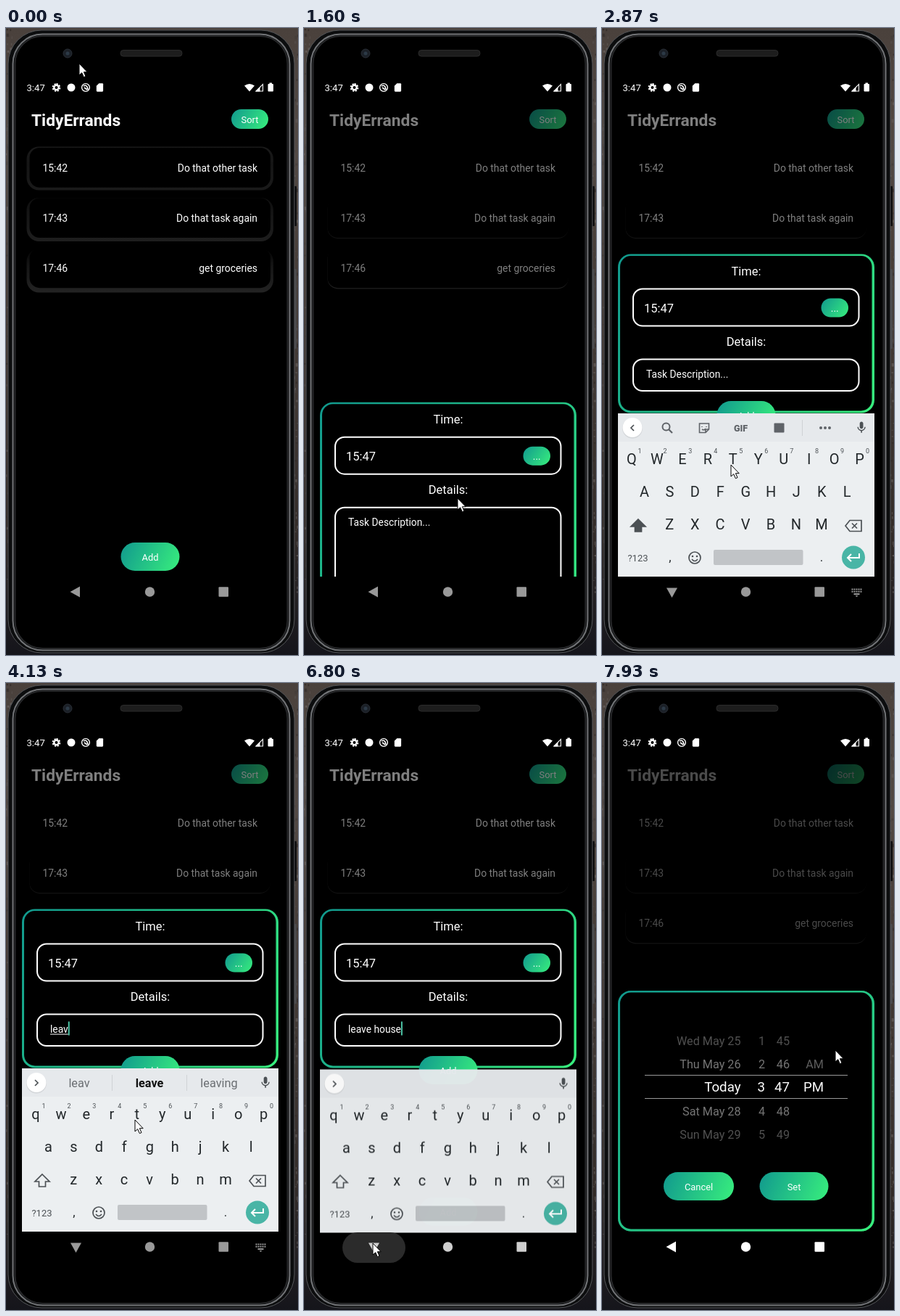
Recreate the animation shown at these times as an HTML page with a canvas. Size 403 by 864 pixels, loop 8000 ms.

```html
<!DOCTYPE html>
<html lang="en">
<head>
<meta charset="utf-8">
<title>Task list on a phone</title>
<style>
html, body { margin: 0; height: 100%; overflow: hidden; background: #000; }
canvas { display: block; }
</style>
</head>
<body>
<canvas id="stage" width="403" height="864"></canvas>
<script>
const stage = document.getElementById('stage');
const layer = stage.cloneNode();
const screen2d = stage.getContext('2d'), layer2d = layer.getContext('2d');
let c = screen2d; // context the helpers draw on
const LOOP = 8000, FPS = 15, TEAL = '#11998e', GREEN = '#38ef7d';
const clamp = v => Math.max(0, Math.min(1, v));
const ease = u => (1 - Math.cos(Math.PI * clamp(u))) / 2;

// ---- drawing helpers ----
function box(x, y, w, h, r, fill, stroke, lw = 1) {
  c.beginPath();
  c.roundRect(x, y, w, h, r);
  if (fill) { c.fillStyle = fill; c.fill(); }
  if (stroke) { c.strokeStyle = stroke; c.lineWidth = lw; c.stroke(); }
}
function disc(x, y, r, fill, stroke, lw) { box(x - r, y - r, 2 * r, 2 * r, r, fill, stroke, lw); }
function shape(d, x, y, scale, fill, stroke, lw = 1) {
  const p = new Path2D(d);
  c.save();
  c.translate(x, y);
  c.scale(scale, scale);
  if (fill) { c.fillStyle = fill; c.fill(p, 'evenodd'); }
  if (stroke) { c.strokeStyle = stroke; c.lineWidth = lw; c.stroke(p); }
  c.restore();
}
function text(s, x, y, size, color = '#fff', align = 'left', weight = 400) {
  c.font = `${weight} ${size}px Roboto, sans-serif`;
  c.textAlign = align;
  c.fillStyle = color;
  c.fillText(s, x, y);
  return c.measureText(s).width;
}
function brand(x, y, w, h) {
  const g = c.createLinearGradient(x, y, x + w, y + h);
  g.addColorStop(0, TEAL);
  g.addColorStop(1, GREEN);
  return g;
}
function pill(label, x, y, w, h, size = 12.9) {
  box(x, y, w, h, h / 2, brand(x, y, w, h));
  text(label, x + w / 2, y + h / 2 + 5, size, '#fff', 'center');
}
function panel(y, h) {
  box(22, y, 354, h, 18, brand(22, y, 354, h));
  box(25, y + 2.5, 347.5, h - 5.5, 15, '#000');
}
function clipTo(bottom, draw) {
  c.save();
  c.beginPath();
  c.rect(22, 70, 354, bottom - 70);
  c.clip();
  draw();
  c.restore();
}
function dim(a) {
  c.fillStyle = `rgba(0,0,0,${a})`;
  c.fillRect(22, 98, 354, 658);
}

// ---- phone body ----
function phone() {
  const g = c.createLinearGradient(0, 0, 0, 864);
  ['#4a413c', '#524944', '#453c37', '#3f3733', '#332c29', '#15151b']
    .forEach((color, i) => g.addColorStop(i / 5, color));
  c.fillStyle = g;
  c.fillRect(0, 0, 403, 864);
  let seed = 7;
  const rnd = () => (seed = seed * 16807 % 2147483647) / 2147483647;
  for (let i = 0; i < 260; i++) {
    const v = 25 + rnd() * 90 | 0;
    c.fillStyle = `rgba(${v + 8},${v + 2},${v},.5)`;
    c.fillRect(rnd() < .5 ? rnd() * 9 : 394 + rnd() * 9, rnd() * 800, 1 + rnd() * 2, 1 + rnd() * 4);
  }
  box(396, 218, 5, 55, 1, '#0b0b0c');
  box(396, 332, 5, 110, 1, '#4a4a4c');
  box(3, 3, 395, 858, 46, '#0c0d0e', '#55575a');
  box(9.5, 8.5, 382, 849, 41, null, '#727477', 2);
  box(12.5, 11, 376, 844, 38, '#000', '#262729', 2);
  box(158, 30.5, 85, 8.5, 4, '#1d1d1d', '#2b2b2b');
  disc(85, 35, 6, '#1b2027', '#2a2f36');
  disc(85, 35, 2.5, '#2c3a47');
}

function statusBar() {
  text('3:47', 28.5, 87, 13.1);
  c.setLineDash([2.2, 1.57]);
  disc(69.5, 82, 4.8, null, '#fff', 2.2);
  c.setLineDash([]);
  disc(69.5, 82, 3.2, null, '#fff', 2.4);
  disc(90, 82, 5.5, '#fff');
  disc(110, 82, 5.4, null, '#fff', 1.4);
  shape('M-3-2Q0-4 2-1Q3 2 3 3M-2 0L2 3', 110, 82, 1, null, '#fff', 1.6);
  shape('M18 2h-8L4 8v12q0 2 2 2h12q2 0 2-2V4q0-2-2-2z', 122.5, 75, .58, '#fff');
  shape('M0 3Q7-2 14 3L7 11z', 329, 76.5, 1, '#fff');
  shape('M.5 10.5L10 1V10.5z', 344.5, 76.5, 1, null, '#fff', 1.1);
  shape('M0 11L6 5V11z', 344.5, 76.5, 1, '#fff');
  box(361.5, 77, 7.5, 10.5, 1, '#fff');
  box(363.5, 75.5, 3.5, 2, 0, '#fff');
}

function taskList(dimmed) {
  text('TidyErrands', 35, 134.5, 22.8, '#fff', 'left', 700);
  pill('Sort', 311, 112, 51, 27);
  [['15:42', 'Do that other task'], ['17:43', 'Do that task again'], ['17:46', 'get groceries']]
    .forEach(([time, task], i) => {
      const y = 165 + i * 69.2, drop = i * 1.3;
      if (!dimmed) {
        const g = c.createLinearGradient(0, y - 2, 0, y + 58 + drop);
        g.addColorStop(0, ['#1a1a1a', '#0e0e0e', '#000'][i]);
        g.addColorStop(.4, '#151515');
        g.addColorStop(1, ['#1a1a1a', '#1e1e1e', '#232323'][i]);
        box(28.5, y - 1.5 + drop, 340.5, 60, 17, g);
      } else if (i) {
        box(32.5, y + 1, 332, 55, 14, ['', '#262626', '#424242'][i]);
      }
      box(32.5, y, 332.5, 54.8, 14, '#000');
      text(time, 50.5, y + 33, 13.9);
      text(task, 347, y + 33, 13.9, '#fff', 'right');
    });
  pill('Add', 158.5, 709, 81, 39);
}

// ---- task form ----
function form(y, small, value, composing, caret) {
  panel(y, small ? 219 : 331.5);
  text('Time:', 199, y + 29.5, 16.5, '#fff', 'center');
  box(43, y + 48, 311.5, 51, 13, null, '#fff', 2);
  text('15:47', 58, y + 80.5, 16.5);
  pill('...', 302.5, y + 61, 37.5, 26, 13.8);
  text('Details:', 199, y + 126, 16.5, '#fff', 'center');
  box(43, y + 145, 311.5, small ? 43.5 : 118, 13, null, '#fff', 2);
  const w = text(value || 'Task Description...', 61, y + 170, 13.8);
  if (composing) {
    const start = c.measureText(value.slice(0, value.lastIndexOf(' ') + 1)).width;
    c.fillStyle = '#fff';
    c.fillRect(61 + start, y + 172, w - start, 1);
  }
  if (caret) {
    c.fillStyle = '#4cc3a5';
    c.fillRect(61 + (value ? w : 0), y + 155, 2, 19);
  }
  pill('Add', 158.5, y + (small ? 202.5 : 276), 81, 39);
}

// ---- date and time wheel ----
function picker(y) {
  panel(y, 331.5);
  const dates = ['Wed May 25', 'Thu May 26', 'Today', 'Sat May 28', 'Sun May 29'];
  dates.forEach((date, i) => {
    const far = Math.abs(i - 2), size = far ? 16.2 : 18.7;
    const color = ['#fff', '#757575', '#505050'][far], base = y + 74.5 + i * 32.4;
    text(date, 191.5, base, size, color, 'right');
    text(i + 1, 225, base, size, color, 'right');
    text(45 + i, 259, base, size, color, 'right');
    if (i == 1 || i == 2) text(i == 1 ? 'AM' : 'PM', 306, base, size, i == 1 ? '#5c5c5c' : color, 'right');
  });
  c.fillStyle = '#999';
  c.fillRect(59, y + 116, 280, 1);
  c.fillRect(59, y + 148, 280, 1);
  pill('Cancel', 85, y + 250, 97, 39);
  pill('Set', 217.5, y + 250, 95, 39);
}

// ---- keyboard ----
const MIC = 'M12 14c1.7 0 3-1.3 3-3V5c0-1.7-1.3-3-3-3S9 3.3 9 5v6c0 1.7 1.3 3 3 3zm5.3-3c0 3-2.5 5.1-5.3 5.1S6.7 14 6.7 11H5c0 3.4 2.7 6.2 6 6.7V21h2v-3.3c3.3-.5 6-3.3 6-6.7z';

function house() {
  box(191, 550, 13, 9, 0, '#f3d9b1');
  box(193, 552, 4, 7, 0, '#8d5a3b');
  box(199, 552, 4, 4, 0, '#5aa9d6');
  box(202, 543, 2.5, 6, 0, '#a5432f');
  shape('M-10 1L0-9L10 1L8 2.5L0-5L-8 2.5z', 198, 551, 1, '#dd4b39');
  shape('M-7 1L0-5.5L7 1z', 198, 550, 1, '#f0a33a');
  disc(204, 558, 2.5, '#5f9e3f');
}
function suggestions(words) {
  c.fillStyle = '#cfd2d5';
  c.fillRect(146, 540, 1, 22);
  c.fillRect(249, 540, 1, 22);
  words.forEach((word, i) => {
    if (word == 'HOUSE') house();
    else text(word, [101, 198, 294][i], 557, 16.3, i == 1 ? '#111' : '#6a6e72', 'center', i == 1 ? 700 : 400);
  });
}
function toolbar() {
  const ink = '#5f6368';
  disc(88.5, 549.5, 5, null, ink, 2);
  shape('M0 0L5 5', 92, 553, 1, null, ink, 2.2);
  shape('M-6-6H6.5V2L2 6.5H-6.5V-6zM6 2H2V6M-3-2v1M3-2v1M-3 2Q0 4 2 1', 141, 551, 1, null, ink, 1.6);
  text('GIF', 191.5, 555.5, 12.5, ink, 'center', 900);
  box(237.5, 544.5, 14, 13, 1, ink);
  c.fillStyle = '#cfd2d5';
  c.fillRect(276, 540, 1, 22);
  [302, 308, 314].forEach(x => disc(x, 551, 2, ink));
}
function keyboard(upper, words) {
  const ink = '#22272a', soft = '#4c5155';
  box(22, 531, 354, 270, 0, '#eceff1');
  box(22, 531, 354, 39, 0, '#e6e9ec');
  disc(42, 551.5, 14, '#d3d6d9');
  disc(42, 550.5, 13.5, '#fff');
  shape(upper ? 'M2-4L-2 0L2 4' : 'M-2-4L2 0L-2 4', 42, 551, 1, null, soft, 1.7);
  shape(MIC, 348.5, 541, .8, soft);
  if (upper) toolbar();
  else if (words) suggestions(words);

  [['qwertyuiop', 41, 601], ['asdfghjkl', 58.5, 646], ['zxcvbnm', 93.2, 691]].forEach(([keys, x, y], row) => {
    [...keys].forEach((key, i) => {
      const kx = x + i * 34.95;
      text(upper ? key.toUpperCase() : key, kx, y, 20, ink, 'center');
      if (!row) text((i + 1) % 10, kx + 11, 586, 9, soft, 'center');
    });
  });
  shape('M0-9L10 1H4.5V8H-4.5V1H-10z', 50, 686, 1, upper ? soft : null, soft, 1.7);
  shape('M-5-7.5H11V7.5H-5L-11 0zM-2-3.5L5 3.5M5-3.5L-2 3.5', 347, 686, 1, null, soft, 1.7);
  text('?123', 49.5, 734.5, 13, soft, 'center');
  text(',', 94, 735, 17, ink, 'center');
  text('.', 303, 735, 17, ink, 'center');
  disc(128, 730, 8, null, soft, 1.7);
  disc(125, 728, 1.3, soft);
  disc(131, 728, 1.3, soft);
  shape('M-4 2Q0 7 4 2', 128, 730, 1, null, soft, 1.7);
  box(154, 719, 123.5, 21, 2, '#c1c4c7');
  disc(347, 729.5, 16, '#49b5a6');
  shape('M8-5V1H-7M-3-4L-8 1L-3 6', 347, 729, 1, null, '#fff', 2);
}

function navBar(color, turn, switcher) {
  c.save();
  c.translate(96.5, 777);
  c.rotate(-turn * Math.PI / 2);
  shape('M-8 0L5.5-7.5V7.5z', 0, 0, 1, color);
  c.restore();
  disc(198.5, 777, 6.7, color);
  box(293.5, 770.3, 13.5, 13.5, 1, color);
  if (!switcher) return;
  for (let i = 0; i < 10; i++) box(344.5 + i % 5 * 3, 772.5 + (i / 5 | 0) * 3.2, 2, 2, 0, color);
  box(347.5, 779, 8, 2, 0, color);
  shape('M-2 0H2L0 2z', 351.5, 782, 1, color);
}

// ---- timeline, counted in steps of 1/15 s ----
const typed = [
  [56, 'l', 'l', "I'll", 'la'], [58, 'le', 'le', 'let', 'left'], [60, 'lea', 'lea', 'leave', 'least'],
  [61, 'leav', 'leav', 'leave', 'leaving'], [65, 'leave', 'leave', 'leaves', 'leaving'],
  [68, 'leave ', 'the', 'it', 'me'], [70, 'leave h', 'h', 'have', 'he'], [72, 'leave ho', 'ho', 'how', 'home'],
  [73, 'leave hou', 'hou', 'hour', 'house'], [74, 'leave hous', 'hous', 'house', 'housing'],
  [76, 'leave house', 'house', 'HOUSE', 'House']
];
const track = [
  [2, 101, 49], [4, 112, 257], [6, 112, 257], [16, 216, 719], [21, 216, 719], [24, 212, 648], [32, 178, 602],
  [83, 178, 602], [89, 287, 410], [96, 75, 800], [97, 75, 800], [100, 95, 772], [102, 95, 772],
  [110, 316, 509], [112, 317, 503], [115, 317, 503], [119, 322, 506]
];

function pointer(n) {
  const i = track.findIndex(k => k[0] >= n), b = track[i], a = track[Math.max(0, i - 1)];
  const u = i ? ease((n - a[0]) / (b[0] - a[0])) : 1;
  shape('M0 0V16L3.7 12.7L6.4 18.7L9 17.5L6.4 11.7H11.2z',
    a[1] + (b[1] - a[1]) * u, a[2] + (b[2] - a[2]) * u, 1, '#fff', '#000', 1);
}

function render(n) {
  const ms = n * 1000 / FPS;
  const entry = typed.filter(k => k[0] <= n).pop();
  const value = entry ? entry[1] : '';
  const rise = ease((ms - 1451) / 230), swap = ease((ms - 7704) / 230);
  const opening = clamp((n - 35) / 4), closing = clamp((n - 101) / 4);
  const keysUp = opening > 0 && closing < 1;
  const small = n >= 39 && n < 104;

  phone();
  taskList(rise > .3);
  if (rise > 0) {
    dim(.5 * clamp(rise * 1.6));
    const top = small ? 311.5 : 424 + 332 * (1 - rise);
    const bottom = n >= 36 && n < 102 ? 531 : 756;
    const caret = n >= 39 && !(n >= 43 && n < 51);
    const composing = value && !value.endsWith(' ') && n < 101;
    clipTo(bottom, () => form(top, small, value, composing, caret));
  }
  if (swap > 0) {
    dim(.42 * clamp(swap * 1.6));
    clipTo(756, () => picker(424 + 332 * (1 - swap)));
  }
  if (keysUp) {
    const sliding = opening < 1, round = [0, 0, 9, 9];
    c = layer2d;
    keyboard(n < 56, closing ? null : entry && entry.slice(2));
    c = screen2d;
    clipTo(sliding ? 799 : 756 + 24 * closing ** 2, () => {
      if (sliding) box(22, 531, 354, 268, round, '#2e2e2e');
      c.beginPath();
      c.roundRect(22, 531, 354, 268, round);
      c.clip();
      c.globalAlpha = sliding ? opening * 1.08 : 1 - closing ** 2.5;
      c.drawImage(layer, 0, 280 * (1 - opening) ** 2 + 24 * closing ** 2);
    });
    if (sliding) box(22, 756, 354, 43, round, 'rgba(50,50,70,.3)');
  }
  if (n >= 100 && n < 106) {
    c.globalAlpha = n < 102 ? (n - 98) / 4 : 1 - Math.max(0, n - 103) / 3;
    box(53, 757, 87, 42, 21, '#2b2b2b');
    c.globalAlpha = 1;
  }
  const navColor = n > 102 ? '#fff' : n == 102 || opening > 0 && opening < 1 ? '#cfcfcf' : '#999';
  const turn = n < 103 ? opening ** 2.4 : 1 - clamp((n - 102) / 3);
  navBar(navColor, turn, n >= 36 && n < 102);
  statusBar();
  pointer(n);
}

let last = -1;
function tick(now) {
  const n = Math.floor(now % LOOP * FPS / 1000 + .06) % (LOOP * FPS / 1000);
  if (n !== last) render(last = n);
  requestAnimationFrame(tick);
}
render(0);
requestAnimationFrame(tick);
</script>
</body>
</html>
```
